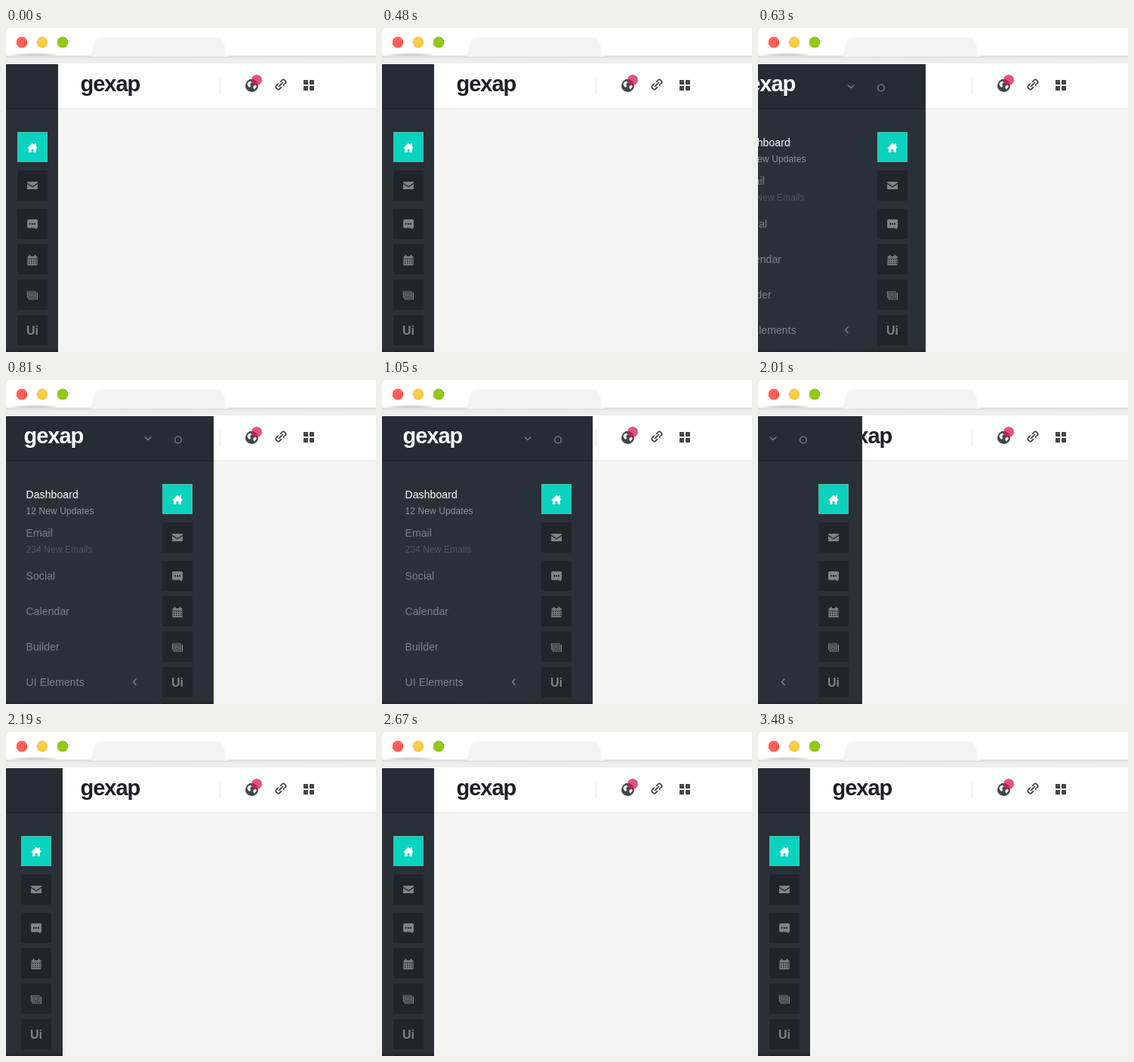
Animation, 490 px wide and 430 px high, one loop 3510 ms. Source, as an HTML page:

```html
<!DOCTYPE html>
<html lang="en">
<head>
<meta charset="utf-8">
<title>Sliding sidebar</title>
<style>
  html, body { margin: 0; width: 100%; height: 100%; overflow: hidden; background: #fff; }
  svg { display: block; width: 490px; height: 430px; }
  text { font-family: "Liberation Sans", Arial, sans-serif; }
  .brand { font-size: 29px; font-weight: bold; letter-spacing: -1px; }
  .item { font-size: 14px; letter-spacing: .1px; }
  .note { font-size: 12px; letter-spacing: .1px; }
  .line { fill: none; stroke: #7d828b; stroke-width: 1.4; }
</style>
</head>
<body>
<svg viewBox="0 0 490 430">
  <defs>
    <filter id="soft" x="-20%" y="-200%" width="140%" height="500%">
      <feGaussianBlur stdDeviation="4 1.8"/>
    </filter>
    <linearGradient id="rim" x1="0" y1="0" x2="0" y2="1">
      <stop offset="0" stop-color="#e6e6e6"/>
      <stop offset=".15" stop-color="#dadada"/>
      <stop offset=".35" stop-color="#ececec"/>
      <stop offset="1" stop-color="#efefef"/>
    </linearGradient>
    <linearGradient id="fade" x1="0" y1="0" x2="0" y2="1">
      <stop offset="0" stop-color="#1e2127" stop-opacity="0"/>
      <stop offset="1" stop-color="#1e2127" stop-opacity=".8"/>
    </linearGradient>
  </defs>

  <!-- browser frame -->
  <rect width="490" height="48" fill="#e6e6e6"/>
  <path d="M0 38V5Q0 0 5 0H490V38Z" fill="#fff"/>
  <ellipse cx="38" cy="37" rx="28" ry="2.500" fill="#b8b8b8" filter="url(#soft)"/>
  <rect y="36.500" width="490" height="10.500" fill="url(#rim)"/>
  <path d="M112 38L117 19Q119 12.500 124 12.500H281Q286 12.500 288 19L293 38Z" fill="#f4f4f4"/>
  <circle cx="21" cy="19" r="7.400" fill="#ff5f57"/>
  <circle cx="48" cy="19" r="7.400" fill="#ffc94b"/>
  <circle cx="75" cy="19" r="7.400" fill="#91c917"/>

  <!-- page -->
  <rect y="47" width="490" height="383" fill="#f4f4f4"/>
  <rect y="47" width="490" height="60" fill="#fff"/>
  <rect y="106.500" width="490" height="1" fill="#e9e9e9"/>
  <text class="brand" x="98.500" y="84" fill="#1d1e22">gexap</text>
  <rect x="283" y="66" width="1" height="22" fill="#e6e6e6"/>
  <circle cx="325.500" cy="76.500" r="8.500" fill="#40434a"/>
  <path d="M319.500 73.500Q321 71 324 70.500L325.500 72.500L323 74.500L324.500 77L322.500 79L320 76.500ZM327.500 77L330.500 75.500L332 77.500L329.500 81.500L327.500 80Z" fill="#fff"/>
  <circle cx="332" cy="69" r="7" fill="#d51f59" fill-opacity=".76"/>
  <path transform="translate(364 75) rotate(-45)" fill="none" stroke="#45474d" stroke-width="1.800"
    d="M-1.500 -3H-6.500L-7.500 -2V2L-6.500 3H-1.500M1.500 -3H6.500L7.500 -2V2L6.500 3H1.500M-4 0H4"/>
  <path d="M394 69h6v6h-6zM402 69h6v6h-6zM394 77h6v6h-6zM402 77h6v6h-6z" fill="#424449"/>

  <!-- sidebar, drawn in its open position -->
  <g id="panel">
    <rect y="48" width="279" height="382" fill="#2a3038"/>
    <rect y="48" width="279" height="59" fill="#262c33"/>
    <rect y="106.500" width="279" height="1.500" fill="#22272d"/>
    <text class="brand" x="27.500" y="84" fill="#fff">gexap</text>
    <g id="labels"></g>
    <path class="line" d="M176.500 396.500L172.500 400.700L176.500 405"/>
  </g>
  <g id="tools" class="line">
    <path d="M188.700 75.500L193 79.500L197.300 75.500"/>
    <circle cx="233" cy="79.500" r="4.400"/>
  </g>
  <g id="icons"></g>
  <rect id="shade" y="425" height="5" fill="url(#fade)"/>
</svg>

<script>
const $ = id => document.getElementById(id);
const LOOP = 3510, SLIDE = 354, OPEN_AT = 558, CLOSE_AT = 1953;
const BOX = "#20242b", GREY = "#7d828c";

const labels = [
  ["Dashboard", 157, "#fff", "item"],
  ["12 New Updates", 178, "#8f949c", "note"],
  ["Email", 208, GREY, "item"],
  ["234 New Emails", 229, "#50555e", "note"],
  ["Social", 265, GREY, "item"],
  ["Calendar", 312, GREY, "item"],
  ["Builder", 359, GREY, "item"],
  ["UI Elements", 406, GREY, "item"]
];
$("labels").innerHTML = labels.map(([text, y, fill, cls]) =>
  `<text class="${cls}" x="30.500" y="${y}" fill="${fill}">${text}</text>`).join("");

// Calendar cells: three rows of four
let cells = "";
for (let i = 0; i < 12; i++)
  cells += `<rect x="${-5 + i % 4 * 3}" y="${-.5 + Math.floor(i / 4) * 2.7}" width="1.600" height="1.500" fill="${BOX}"/>`;

// Each glyph is centred on its 40 px box
const glyphs = [
  [138, `<path d="M0 -5.500L3 -2.800V-5H5V-1L7 1.500H5V7H1.500V3H-1.500V7H-5V1.500H-7Z" fill="#fff"/>`],
  [189, `<path d="M-7 -5H7V-3.500L0 1L-7 -3.500ZM-7 -2L0 2.500L7 -2V5H-7Z"/>`],
  [240, `<path d="M-5.500 -6H5.500Q7 -6 7 -4.500V4Q7 5.500 5.800 5.500L5.500 7.500L3 5.500H-5.500Q-7 5.500 -7 4V-4.500Q-7 -6 -5.500 -6Z"/>
         <path d="M-4 -1h2v2h-2zM-1 -1h2v2h-2zM2 -1h2v2h-2z" fill="${BOX}"/>`],
  [287, `<path d="M-6.500 -4H6.500V-2H-6.500ZM-6.500 -1.500H6.500V8H-6.500ZM-4.500 -6h2v2h-2zM2.500 -6h2v2h-2z"/>${cells}`],
  [334, `<path d="M-6.500 4.500V-4H5M-4.500 -2H6.500V6H-4.500ZM-2.200 .2H1V4H-2.200Z" fill="none" stroke="${GREY}" stroke-width="1.200"/>
         <path d="M2.500 -.4H5.500V.8H2.500ZM2.500 1.500H5.500V2.700H2.500ZM2.500 3.400H5.500V4.600H2.500Z"/>`],
  [381, `<text y="5.500" font-size="16" font-weight="bold" text-anchor="middle">Ui</text>`],
  [428, ""]
];
$("icons").innerHTML = `<rect x="211" y="138" width="40" height="40" fill="#4dbcae"/>` +
  glyphs.map(([y, art], i) => {
    const inset = i ? 0 : 1, size = 40 - 2 * inset;
    return `<rect x="${211 + inset}" y="${y + inset}" width="${size}" height="${size}" fill="${i ? BOX : "#0bd3bd"}"/>
      <g transform="translate(231 ${y + 20})" fill="${GREY}">${art}</g>`;
  }).join("");

const bezier = (a, b, s) => 3 * (1 - s) * (1 - s) * s * a + 3 * (1 - s) * s * s * b + s * s * s;

// Timing curve: cubic-bezier(.05, .74, .27, .99)
function ease(x) {
  if (x <= 0) return 0;
  if (x >= 1) return 1;
  let lo = 0, hi = 1;
  for (let i = 0; i < 24; i++) {
    const mid = (lo + hi) / 2;
    if (bezier(.05, .27, mid) < x) lo = mid; else hi = mid;
  }
  return bezier(.74, .99, lo);
}

const shift = (id, x) => $(id).setAttribute("transform", `translate(${Math.round(x)} 0)`);

function draw(t) {
  const away = 1 - ease((t - OPEN_AT) / SLIDE) + ease((t - CLOSE_AT) / SLIDE);
  shift("panel", -210 * away);
  shift("tools", -258 * away);
  shift("icons", -196 * away);
  $("shade").setAttribute("width", Math.round(279 - 210 * away));
}

const start = performance.now();
function tick() {
  draw((performance.now() - start) % LOOP);
  requestAnimationFrame(tick);
}
tick();
</script>
</body>
</html>
```
